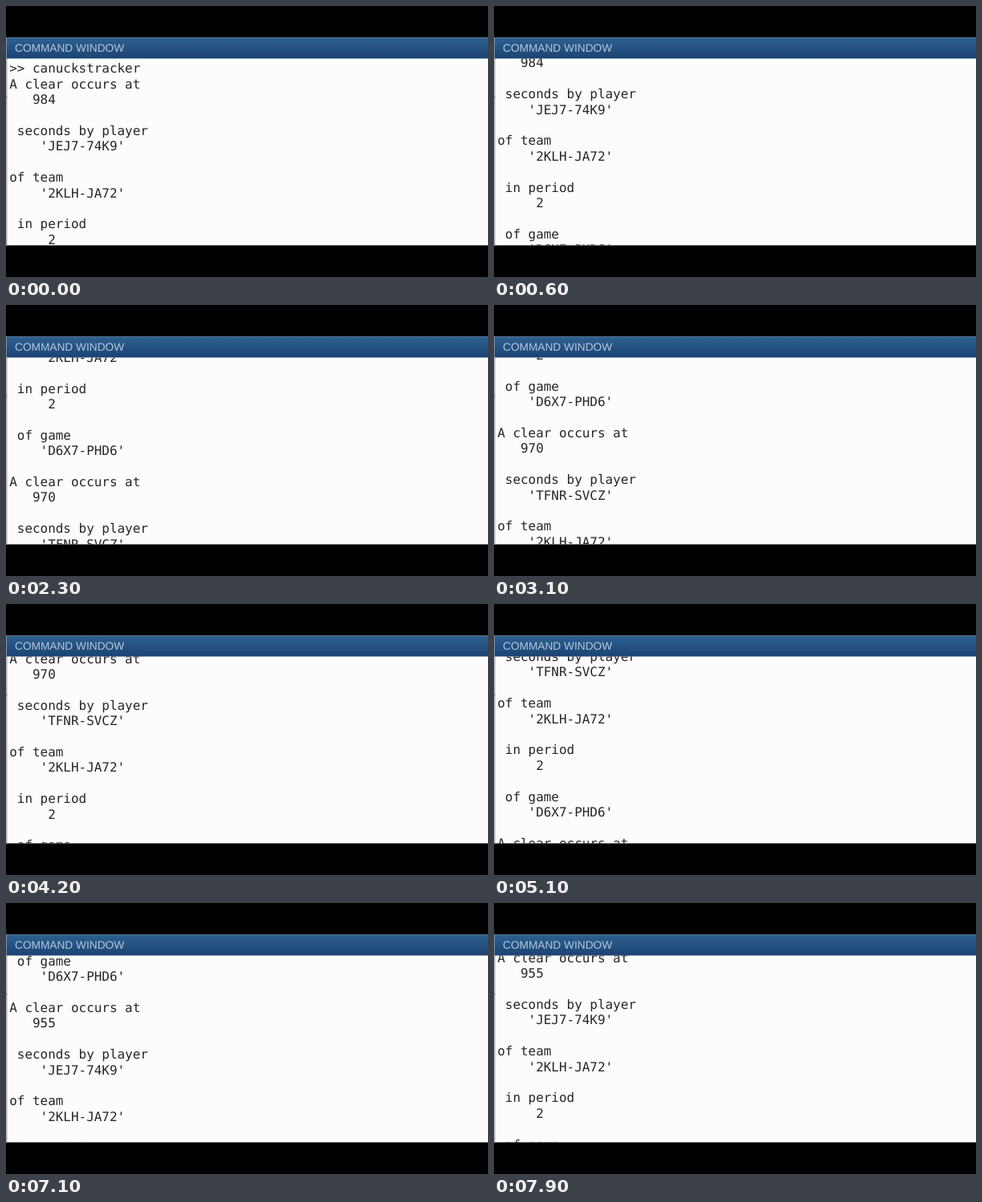
Write an HTML page that moves like this. It is 600 px wide and 338 px high and loops after 8 s.

```html
<!DOCTYPE html>
<html lang="en">
<head>
<meta charset="utf-8">
<title>Command window</title>
<style>
  html, body { margin: 0; width: 100%; height: 100%; overflow: hidden; background: #000; }
  svg { display: block; width: 100vw; height: 100vh; }
  text { white-space: pre; text-rendering: geometricPrecision; }
  #log { font: 15.95px "DejaVu Sans Mono", monospace; fill: #26262a; }
  #title { font: 13.7px "Liberation Sans", Arial, sans-serif; fill: #b5c8dc; }
</style>
</head>
<body>
<svg viewBox="0 0 600 338">
  <defs>
    <linearGradient id="bar" x2="0" y2="1">
      <stop offset="0" stop-color="#30628f"/>
      <stop offset=".15" stop-color="#2b5c8d"/>
      <stop offset="1" stop-color="#1b4373"/>
    </linearGradient>
    <clipPath id="pane"><rect y="65.5" width="600" height="233"/></clipPath>
  </defs>
  <rect width="600" height="338"/>
  <rect y="39.5" width="600" height="259" fill="#fcfbfd"/>
  <rect y="65" width="1.6" height="233.5" fill="#aeb0bb"/>
  <rect y="113" width="1.6" height="1" fill="#777a86"/>
  <rect x="1" y="39.5" width="599" height="26" fill="url(#bar)"/>
  <rect y="39.5" width="1" height="26" fill="#8294ac"/>
  <text id="title" x="11" y="57">COMMAND WINDOW</text>
  <g clip-path="url(#pane)"><g id="log"></g></g>
</svg>
<script>
  const LOOP = 8000, FRAME = 100;
  const PITCH = 19.4, BASE = 83.3, LEFT = 4.2;
  const STEP_MS = 197, STEP = 15.24;

  const entry = (time, player) => [
    "A clear occurs at", `   ${time}`, "",
    " seconds by player", `    '${player}'`, "",
    "of team", "    '2KLH-JA72'", "",
    " in period", "     2", "",
    " of game", "    'D6X7-PHD6'", ""
  ];
  const lines = [
    ">> canuckstracker",
    ...entry(984, "JEJ7-74K9"),
    ...entry(970, "TFNR-SVCZ"),
    ...entry(955, "JEJ7-74K9")
  ];

  const log = document.getElementById("log");
  lines.forEach((line, i) => {
    if (!line) return;
    const el = document.createElementNS("http://www.w3.org/2000/svg", "text");
    el.setAttribute("x", LEFT);
    el.setAttribute("y", BASE + i * PITCH);
    el.textContent = line;
    log.append(el);
  });

  // The log moves up in even jumps, slightly longer near the end.
  function scrollAt(t) {
    const n = Math.floor(t / STEP_MS);
    return n * STEP + Math.max(0, n - 36) * 0.35;
  }

  function draw() {
    const t = Math.floor(performance.now() % LOOP / FRAME) * FRAME;
    log.setAttribute("transform", `translate(0 ${-scrollAt(t)})`);
    requestAnimationFrame(draw);
  }
  draw();
</script>
</body>
</html>
```
